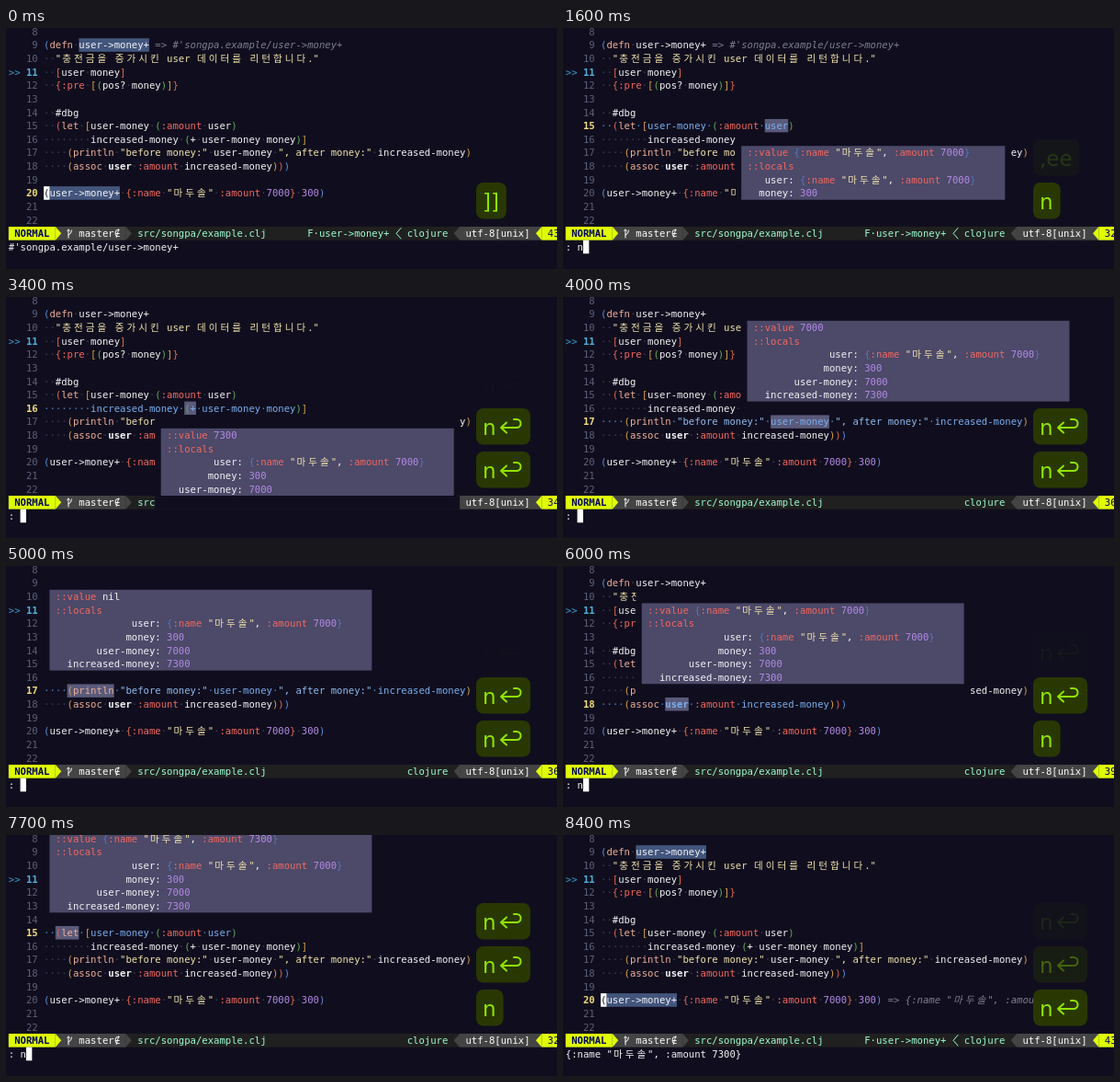
An HTML page with a canvas that plays this animation: 600 px wide and 262 px high, repeating every 8.5 s.

```html
<!DOCTYPE html>
<html lang="ko">
<head>
<meta charset="utf-8">
<title>Stepping through a debugger</title>
<style>
html, body { margin: 0; width: 100%; height: 100%; overflow: hidden; background: #100e1e; }
canvas { display: block; width: 600px; height: 262px; }
</style>
</head>
<body>
<canvas id="stage"></canvas>
<script>
(() => {
const canvas = document.getElementById('stage');
const ctx = canvas.getContext('2d');
const ratio = window.devicePixelRatio || 1;
canvas.width = 600 * ratio;
canvas.height = 262 * ratio;

const LOOP = 8500, CELL = 6.38, ROW = 14.63, LEFT = 2.8, GUTTER = 6;
const MONO = '"DejaVu Sans Mono", monospace';
const HANGUL = '"Noto Sans CJK KR", "Noto Sans CJK", sans-serif';
const BG = '#100e1e', WHITE = '#f4f4f6', RED = '#f4685f', CREAM = '#f1e3ac',
  PURPLE = '#b48ae6', BLUE = '#79b0f2', SALMON = '#efae98', DOT = '#3b3d57',
  POPUP = '#4c4969', MARK = '#5a5a7a', LIME = '#dfff00', MINT = '#9cffd3', KEY = '#90e400';
const BRACKETS = ['#5f8fdc', '#e2694f', '#d9a24a', '#5fae58', '#4f9fc8'];

const PERSON = '{:name "마두솔", :amount 7000}';
const RESULT = PERSON.replace('7000', '7300');
const VAR = "#'songpa.example/user->money+";

const code = [
  '(defn user->money+',
  '  "충전금을 증가시킨 user 데이터를 리턴합니다."',
  '  [user money]',
  '  {:pre [(pos? money)]}',
  '',
  '  #dbg',
  '  (let [user-money (:amount user)',
  '        increased-money (+ user-money money)]',
  '    (println "before money:" user-money ", after money:" increased-money)',
  '    (assoc user :amount increased-money)))',
  '',
  '(user->money+ {:name "마두솔" :amount 7000} 300)'
];
const locals = [['user', PERSON], ['money', '300'], ['user-money', '7000'], ['increased-money', '7300']];

// Debugger stops: time, line, column, marked length, value, number of locals
const stops = [
  [800, 15, 28, 4, PERSON, 2],
  [1650, 15, 19, 8, '7000', 2],
  [2250, 16, 27, 10, '7000', 3],
  [2750, 16, 38, 5, '300', 3],
  [3350, 16, 24, 2, '7300', 3],
  [3850, 17, 29, 10, '7000', 4],
  [4400, 17, 57, 15, '7300', 4],
  [4900, 17, 4, 8, 'nil', 4],
  [5450, 18, 11, 4, PERSON, 4],
  [6100, 18, 24, 15, '7300', 4],
  [6500, 18, 4, 6, RESULT, 4],
  [7350, 15, 2, 4, RESULT, 4],
  [7500, 15, 2, 4, RESULT, 4]
].map(([at, line, col, len, value, count]) => ({ at, line, col, len, value, count }));
const END = 7800;

const enters = stops.slice(1).map(s => s.at).concat(END);
const keyRows = [
  { start: -200, end: -100, text: ']]' },
  { start: 350, end: 600, text: ',ee' },
  ...enters.map((end, i) => ({
    start: Math.max(end - 260, i ? enters[i - 1] + 40 : 0), end, text: 'n', enter: true
  }))
];

const colX = col => LEFT + col * CELL;
const midY = line => 18.5 + ROW * (line - 9);
const topY = line => midY(line) - ROW / 2;
const isWide = ch => /[가-힣]/.test(ch);

function rect(col, line, cols, lines, color) {
  ctx.fillStyle = color;
  ctx.fillRect(colX(col), topY(line), cols * CELL, lines * ROW);
}

// Writes on the character grid and returns the next free column.
function put(text, col, line, color, style = '') {
  ctx.fillStyle = color;
  ctx.textAlign = 'left';
  for (const ch of text) {
    const wide = isWide(ch);
    ctx.font = `${style} 10.6px ${wide ? HANGUL : MONO}`;
    if (ch !== ' ') ctx.fillText(ch, colX(col) + (wide ? 1.1 : 0), midY(line) + 3.9);
    col += wide ? 2 : 1;
  }
  return col;
}

const TOKEN = /"[^"]*"|:{1,2}[a-z]+|\b\d+\b|[()[\]{}]| |[^\s()[\]{}"]+/g;

function tokenColor(token, plain) {
  if (token[0] === '"') return CREAM;
  if (token[0] === ':') return RED;
  if (/^\d+$/.test(token)) return PURPLE;
  if (/^(defn|let|assoc|println)$/.test(token)) return SALMON;
  return plain;
}

function drawCode(current) {
  let depth = 0;
  code.forEach((text, i) => {
    const line = i + 9, active = line === current;
    const dot = active ? '#4b83c4' : DOT;
    let col = GUTTER;
    for (const token of text.match(TOKEN) || []) {
      if (token === ' ') {
        col = put('·', col, line, dot);
      } else if (/^[([{]$/.test(token)) {
        col = put(token, col, line, BRACKETS[depth++ % 5]);
      } else if (/^[)\]}]$/.test(token)) {
        col = put(token, col, line, BRACKETS[--depth % 5]);
      } else {
        let color = tokenColor(token, active ? BLUE : WHITE);
        if (active && color === CREAM) color = '#8fbcf0';
        const bold = line === 18 && token === 'user';
        col = put(token, col, line, color, bold ? 'bold' : '');
      }
    }
  });
}

function drawGutter(current) {
  for (let n = 8; n <= 22; n++) {
    const color = n === current ? '#f3dc7c' : n === 11 ? '#4fb2dc' : '#5d5f79';
    put(String(n).padStart(2), 3, n, color, n === current || n === 11 ? 'bold' : '');
  }
  put('>>', 0, 11, '#3d9ccb');
}

function arrow(col, dir, color) {
  const tip = dir > 0 ? col + 1 : col, base = dir > 0 ? col : col + 1;
  ctx.fillStyle = color;
  ctx.beginPath();
  ctx.moveTo(colX(base), topY(23));
  ctx.lineTo(colX(tip), midY(23));
  ctx.lineTo(colX(base), topY(24));
  ctx.fill();
}

function strokePath(path, color, width) {
  ctx.strokeStyle = color;
  ctx.lineWidth = width;
  ctx.lineCap = ctx.lineJoin = 'round';
  ctx.stroke(new Path2D(path));
}

function drawStatus(line, showName) {
  rect(0, 23, 95, 1, '#202020');
  rect(0, 23, 8, 1, LIME);
  rect(8, 23, 12, 1, '#444444');
  arrow(8, 1, LIME);
  arrow(20, 1, '#444444');
  put('NORMAL', 1, 23, '#00005f', 'bold');
  strokePath('M68 219V228M68 225Q71.5 224 71.5 220M66.8 220.5L68 219L69.2 220.5', '#fff', 1);
  put('master∉', 12, 23, '#fff');
  put('src/songpa/example.clj', 22, 23, MINT);
  if (showName) {
    put('F·user->money+', 51, 23, MINT);
    strokePath('M430 217.5L425 223.3L430 229', MINT, 1);
  }
  put('clojure', 68, 23, MINT);
  arrow(76, -1, '#444444');
  rect(77, 23, 14, 1, '#444444');
  put('utf-8[unix]', 78, 23, '#fff');
  arrow(90, -1, LIME);
  rect(91, 23, 4, 1, LIME);
  put(Math.floor(100 * line / 46) + '%', 92, 23, '#00005f');
}

function putValue(text, col, line) {
  for (const token of text.match(TOKEN)) {
    const brace = /^[{}]$/.test(token);
    col = put(token, col, line, brace ? '#5577bd' : tokenColor(token, WHITE));
  }
}

function drawPopup({ line, col, value, count }) {
  const shown = locals.slice(0, count);
  const label = Math.max(...shown.map(([name]) => name.length));
  const width = label + 40, height = count + 2;
  const left = GUTTER + Math.max(1, col - 4);
  const first = count > 3 ? line - 1 - height : line + 2;
  rect(left - 1, first - 1, width + 2, height + 2, BG);
  rect(left, first, width, height, POPUP);
  put('::value', left + 1, first, RED);
  putValue(value, left + 9, first);
  put('::locals', left + 1, first + 1, RED);
  shown.forEach(([name, val], i) => {
    put(name.padStart(label) + ':', left + 3, first + 2 + i, WHITE);
    putValue(val, left + 5 + label, first + 2 + i);
  });
}

function drawKeys(t) {
  const rows = keyRows.filter(r => r.start <= t).reverse().slice(0, 3);
  rows.forEach((row, i) => {
    const age = t - row.end;
    const fade = Math.min(1, Math.max(0, (age - 700) / 500));
    if (fade === 1) return;
    const y = 168 - 47 * i, entered = row.enter && age >= 0;
    ctx.globalAlpha = (1 - fade) ** 2;
    ctx.font = '23px "DejaVu Sans", sans-serif';
    const width = entered ? 59 : ctx.measureText(row.text).width + 15;
    ctx.fillStyle = '#293803';
    ctx.beginPath();
    ctx.roundRect(512, y, width, 39.5, 8);
    ctx.fill();
    ctx.fillStyle = KEY;
    ctx.fillText(row.text, 519, y + 29);
    if (entered) {
      ctx.save();
      ctx.translate(538, y);
      strokePath('M1 21H18A4.5 4.5 0 0 0 18 12H15M7 15.5L1 21L7 26.5', KEY, 2);
      ctx.restore();
    }
    ctx.globalAlpha = 1;
  });
}

function draw(t) {
  const stop = t < END ? stops.filter(s => s.at <= t).pop() : null;
  const line = stop ? stop.line : 20;
  ctx.setTransform(ratio, 0, 0, ratio, 0, 0);
  ctx.fillStyle = BG;
  ctx.fillRect(0, 0, 600, 262);

  if (stop) {
    rect(GUTTER + stop.col, line, stop.len, 1, MARK);
  } else {
    rect(GUTTER + 6, 9, 12, 1, '#42557c');
    rect(GUTTER + 1, 20, 12, 1, '#42557c');
  }
  drawGutter(line);
  drawCode(stop ? line : 0);
  if (t < 2000) put('=> ' + VAR, GUTTER + 19, 9, '#7d7f91', 'italic');
  if (!stop) {
    rect(GUTTER, 20, 1, 1, '#fff');
    put('(', GUTTER, 20, BG);
  }
  if (t >= END) put('=> ' + RESULT, GUTTER + 49, 20, '#7d7f91', 'italic');

  drawStatus(line, !stop || t < 3000);
  if (stop) {
    drawPopup(stop);
    const typed = keyRows.some(r => r.enter && r.start <= t && t < r.end);
    const col = put(typed ? ': n' : ': ', 0, 24, WHITE);
    rect(col, 24, 1, 1, '#fff');
  } else {
    put(t < END ? VAR : RESULT, 0, 24, WHITE);
  }
  drawKeys(t);
}

function tick(now) {
  draw(Math.floor((now % LOOP) / 100) * 100);
  requestAnimationFrame(tick);
}
requestAnimationFrame(tick);
})();
</script>
</body>
</html>
```
